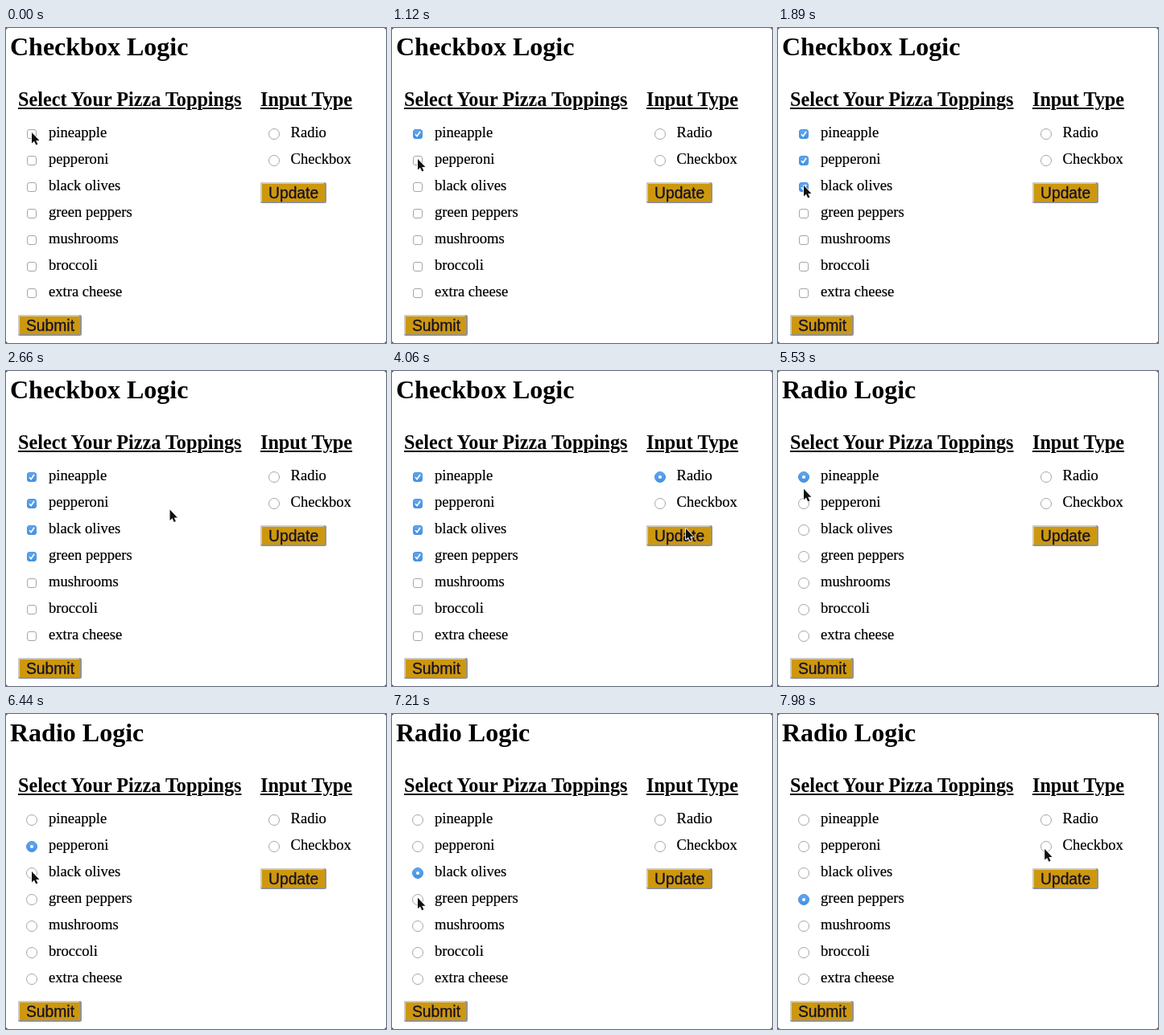
Animation of 472 by 392 pixels, one loop 8 s. Source, as an HTML page:

```html
<!DOCTYPE html>
<html lang="en">
<head>
<meta charset="utf-8">
<title>Pizza toppings form</title>
<style>
  html, body { margin: 0; width: 100%; height: 100%; overflow: hidden; }
  html { background: #222; }
  body { background: #fff; border-radius: 3px; }
  h2 {
    position: absolute; top: 77px; margin: 0; white-space: nowrap;
    font: bold 24.2px/24px "Liberation Serif", Times, serif; color: #000;
    text-decoration: underline 2px; text-underline-offset: 2px;
  }
  svg { position: absolute; left: 0; top: 0; }
  .title { font: bold 32px "Liberation Serif", Times, serif; }
  .label { font: 18.6px "Liberation Serif", Times, serif; stroke: #000; stroke-width: .2; }
  .button { font: 19.3px "Liberation Sans", Arial, sans-serif; fill: #15102a; stroke: #15102a; stroke-width: .3; }
</style>
</head>
<body>
<h2 style="left:15px">Select Your Pizza Toppings</h2>
<h2 style="left:316px">Input Type</h2>
<svg id="stage" width="472" height="392" viewBox="0 0 472 392">
  <defs>
    <linearGradient id="blue" x2="0" y2="1">
      <stop stop-color="#62a8f0"/><stop offset="1" stop-color="#438fe2"/>
    </linearGradient>
  </defs>
</svg>
<script>
const LOOP = 8000, STEP = 70, CLICK_LEAD = 140;
const TOPPINGS = ["pineapple", "pepperoni", "black olives", "green peppers",
                  "mushrooms", "broccoli", "extra cheese"];
const LEFT = 32, RIGHT = 333;
const rowY = row => 132 + 33 * row;

// The pointer clicks each spot in turn, just before leaving for the next.
const spot = (x, row) => ({ x, y: rowY(row) - 2 });
const firstFour = TOPPINGS.slice(0, 4).map((_, row) => spot(LEFT, row));
const SPOTS = [...firstFour, spot(RIGHT - 1, 0), spot(365, 2), ...firstFour, spot(RIGHT - 1, 1.15)];
const DEPART = [700, 1540, 2030, 2420, 3570, 4410, 5380, 6090, 6930, 7560];
const RADIO_CLICK = 5, UPDATE_CLICK = 6;

const stage = document.getElementById("stage");

function add(tag, attrs, parent = stage, text = "") {
  const node = document.createElementNS("http://www.w3.org/2000/svg", tag);
  for (const key in attrs) node.setAttribute(key, attrs[key]);
  node.textContent = text;
  parent.appendChild(node);
  return node;
}

const show = (node, on) => node.setAttribute("visibility", on ? "visible" : "hidden");
const text = (cls, x, y, value) => add("text", { class: cls, x, y }, stage, value);

function input(type, checked, x, y) {
  const g = add("g", { transform: `translate(${x} ${y})` });
  const skin = checked ? { fill: "url(#blue)", stroke: "#4a92e0" }
                       : { fill: "#fff", stroke: "#a6a6a6" };
  if (type === "radio") {
    add("circle", { r: 6.5, ...skin }, g);
    if (checked) add("circle", { r: 2.1, fill: "#fff" }, g);
  } else {
    add("rect", { x: -5.5, y: -5.5, width: 11, height: 11, rx: 2.5, ...skin }, g);
    if (checked) add("path", { d: "M-3 .3L-.9 2.7L3-3", fill: "none", stroke: "#fff", "stroke-width": 1.7 }, g);
  }
  return g;
}

// Both states of one control; only one is visible at a time.
function control(type, x, y) {
  const off = input(type, false, x, y), on = input(type, true, x, y);
  return (visible, checked) => {
    show(off, visible && !checked);
    show(on, visible && checked);
  };
}

function button(label, x, y, width) {
  const height = 26, right = x + width, bottom = y + height;
  add("rect", { x, y, width, height, rx: 2.5, fill: "#929292" });
  add("path", { d: `M${x} ${bottom - 2}V${y + 2}l2-2H${right - 2}l-2 2L${x + 2} ${bottom - 2}z`, fill: "#cfcabf" });
  add("rect", { x: x + 2, y: y + 2, width: width - 4, height: height - 4, fill: "#cd980e" });
  text("button", x + 10, y + 20, label);
}

const title = text("title", 5, 34, "");
const rows = TOPPINGS.map((name, i) => {
  const y = rowY(i);
  text("label", 53, y + 4, name);
  return { box: control("checkbox", LEFT, y), radio: control("radio", LEFT, y) };
});
const types = ["Radio", "Checkbox"].map((name, i) => {
  const y = rowY(i);
  text("label", 353.5, y + 4, name);
  return control("radio", RIGHT, y);
});
button("Submit", 15, 357, 79);
button("Update", 316, 192, 82);

const pointer = add("path", {
  d: "M0 0V13.5L3 10.8L5.2 15.6L7.4 14.6L5.2 10H9.4Z",
  fill: "#111", stroke: "#fff", "stroke-width": 1.6, "paint-order": "stroke", "stroke-linejoin": "round"
});

function pointerAt(t) {
  const moves = DEPART.filter(at => t >= at).length;
  const to = SPOTS[moves];
  if (!moves) return [to.x, to.y];
  const from = SPOTS[moves - 1], dx = to.x - from.x, dy = to.y - from.y;
  const duration = 280 + Math.hypot(dx, dy) / 2;
  const u = Math.min(1, (t - DEPART[moves - 1]) / duration), e = u * u * (3 - 2 * u);
  return [from.x + dx * e, from.y + dy * e];
}

function render(time) {
  const t = Math.floor((time % LOOP) / STEP) * STEP;
  const clicks = DEPART.filter(at => t >= at - CLICK_LEAD).length;
  const updated = clicks >= UPDATE_CLICK;
  title.textContent = (updated ? "Radio" : "Checkbox") + " Logic";
  rows.forEach(({ box, radio }, i) => {
    box(!updated, i < Math.min(clicks, firstFour.length));
    radio(updated, i === clicks - UPDATE_CLICK - 1);
  });
  types[0](true, clicks === RADIO_CLICK);
  types[1](true, false);
  pointer.setAttribute("transform", `translate(${pointerAt(t)})`);
}

const start = performance.now();
function tick() {
  render(performance.now() - start);
  requestAnimationFrame(tick);
}
tick();
</script>
</body>
</html>
```
